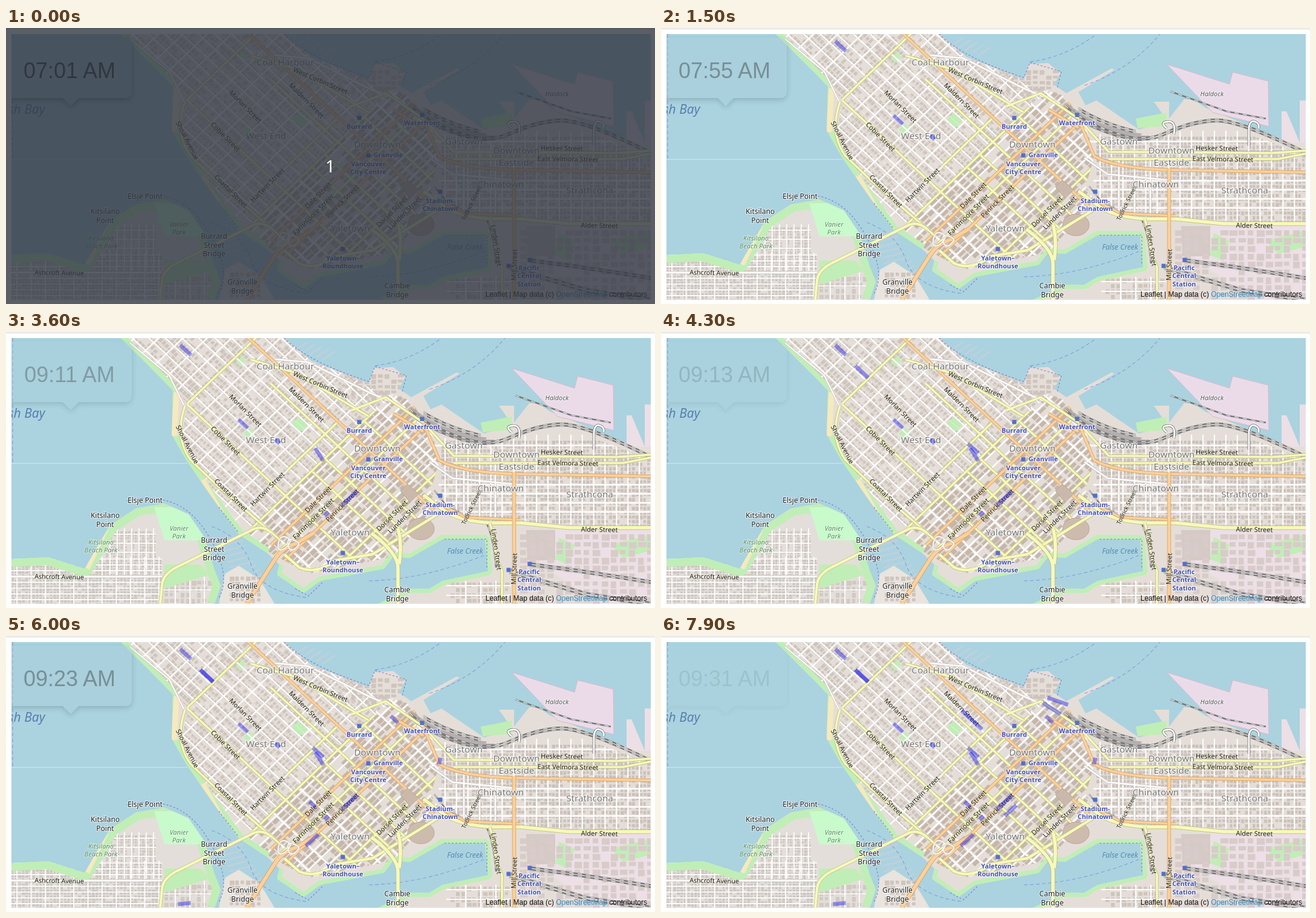
Write an HTML page that moves like this. It is 1073 px wide and 457 px high and loops after 8000 ms.

```html
<!DOCTYPE html>
<html lang="en">
<head>
<meta charset="utf-8">
<title>City map timeline</title>
<style>
html, body { margin: 0; width: 100%; height: 100%; overflow: hidden; background: #fff; }
svg { display: block; width: 100vw; height: 100vh; }
.map text { font-family: "Noto Sans", sans-serif; text-anchor: middle; paint-order: stroke; stroke-linejoin: round; }
.ui { font-family: "Liberation Sans", Arial, sans-serif; }
</style>
</head>
<body>
<svg id="stage" viewBox="0 0 1073 457" xmlns="http://www.w3.org/2000/svg"></svg>
<script>
const WHITE = ['#fff', '#cbc3bd'], YELLOW = ['#f6f9ba', '#b9b878'], ORANGE = ['#fbd09b', '#d09c60'];
const GREEN = '#c0eeb6', PARK = '#c8facc', WATER = '#aad3df';

let seed = 7;
const rnd = () => (seed = (seed * 16807) % 2147483647) / 2147483647;
const range = (a, b, step) => Array.from({ length: Math.floor((b - a) / step) + 1 }, (_, i) => a + i * step);
const shape = (d, fill, extra = '') => `<path d="${d}" fill="${fill}" ${extra}/>`;
const line = (d, color, w, extra = '') =>
  `<path d="${d}" fill="none" stroke="${color}" stroke-width="${w}" stroke-linejoin="round" ${extra}/>`;
const road = (d, [fill, edge], w) => line(d, edge, w + 1.4) + line(d, fill, w);
const group = (body, attrs) => `<g ${attrs}>${body}</g>`;
const clipped = (body, id) => group(body, `clip-path="url(#${id})"`);
const rows = (y0, y1, step, x0, x1) => range(y0, y1, step).map(y => `M${x0} ${y}H${x1}`).join('');
const cols = (x0, x1, step, y0, y1) => range(x0, x1, step).map(x => `M${x} ${y0}V${y1}`).join('');

// loose rows of small buildings filling a rectangle
function boxes(x0, y0, x1, y1, dx, dy, fill) {
  let d = '';
  for (let x = x0; x < x1; x += dx) for (let y = y0; y < y1; y += dy) {
    const w = (dx * (0.55 + 0.35 * rnd())).toFixed(1), h = (dy * (0.5 + 0.4 * rnd())).toFixed(1);
    if (rnd() < 0.85) d += `M${x.toFixed(1)} ${y.toFixed(1)}h${w}v${h}h-${w}z`;
  }
  return shape(d, fill);
}

// text may hold several rows, split by |
function label(str, x, y, size, color, o = {}) {
  const spans = str.split('|').map((s, i) => `<tspan x="${x}" y="${y + i * (o.gap || 14)}">${s}</tspan>`).join('');
  return `<text font-size="${size}" fill="${color}" stroke="${o.halo || '#fff'}" stroke-width="${o.hw ?? 2}"` +
    ` stroke-opacity=".7" ${o.bold ? 'font-weight="700"' : ''} ${o.italic ? 'font-style="italic"' : ''}` +
    ` ${o.rot ? `transform="rotate(${o.rot} ${x} ${y - 4})"` : ''}>${spans}</text>`;
}

const west = '190 10L252 72 276 97 274 170 300 215 352 290 385 335 432 366';
const south = '452 385L448 402 492 432 520 412 625 392 640 372 668 374 722 343H792L797 396 722 412 700 425 668 425 615 450';
const north = '1066 120H1056V190L1034 138H1026V184L900 132 880 118H865L840 150V122H815L838 155 790 168 720 120 702 128 690 106' +
  ' 750 69 745 67 670 108 650 94 660 74 640 58 608 60 600 85 505 48 460 10';
const bay = '9 376L70 373 130 392 172 320 215 292 262 284 302 302 328 340 345 395 355 420 345 450';
const land = `M${west}L${south}H1066L${north}Z`;
const kits = `M${bay}H9Z`;
const core = 'M180 0H450L600 92 665 112 700 150 716 215 702 262 716 285 640 372 500 400 430 362 352 290 290 180 300 118Z';
const east = 'M702 175L835 178 912 155 1066 210V325L760 312 712 290 718 215Z';

function areas() {
  return shape(land, '#e5ded8') + shape(kits, '#e3deda') + shape('M362 400L385 387 420 410 444 450H352Z', '#e9e4de') +
    shape('M836 60L940 93 945 73 1004 88 1005 163 912 140Z', '#ebdbe8', 'stroke="#d5b9ce"') +
    clipped(shape('M1020 120H1066V190H1020ZM910 325H1066V450H980L880 382Z', '#ecdfe5'), 'land') +
    shape('M914 340L940 352 930 386 908 376ZM1000 352L1066 335V362L1020 374ZM785 150L836 140V162L788 166Z', GREEN) +
    shape('M860 328H908V378H862Z', '#d5cac5');
}

// downtown streets follow two slanted axes
function downtown() {
  let g = boxes(150, 40, 518, 380, 6.97, 9.37, '#cec4bc') + boxes(520, 30, 760, 400, 8.5, 15, '#c6b7ab');
  g += shape('M395 160h13v-15h-13zM438 228h20v-16h-20zM300 238h10v-15h-10z', GREEN);
  g += line(rows(23, 380, 18.75, 150, 520), '#fff', 2.3) + line(cols(154.5, 500, 27.9, 30, 380), '#fff', 2.1);
  g += line(rows(32, 375, 18.75, 294, 500), '#f3efec', 0.8);
  g += line(rows(57, 400, 30, 515, 760) + cols(526, 740, 17, 30, 400), '#fff', 2.5);
  g += road(rows(177, 207, 30, 520, 700) + 'M294 117H720M365 237H705M520 297H690M294 117V280M489 150V270M518 40V320M577 30V380M663 40V330', YELLOW, 3.6);
  g += road('M270 267H735M560 40V385M594 10V390', ORANGE, 4);
  return clipped(clipped(group(g, 'transform="matrix(.73 .68 .72 -.69 0 0)"'), 'core'), 'land');
}

function districts() {
  const e = boxes(720, 180, 1066, 325, 6.3, 7.3, '#cac1ba') + line(cols(726, 1066, 18.9, 170, 325), '#fff', 2) +
    line('M700 188H1066' + rows(253, 300, 15, 700, 1066), '#fff', 2.4);
  const k = boxes(9, 377, 258, 450, 5.8, 4.8, '#cbc5c0') + boxes(165, 330, 245, 377, 6, 5, '#cfc7c0') +
    boxes(262, 412, 345, 450, 9, 10, '#d2c9c2') + line(cols(18, 260, 23.5, 372, 450) + cols(172, 245, 12, 325, 402), '#fff', 1.7) +
    line(rows(376, 450, 9.6, 9, 258) + rows(335, 365, 15, 165, 248) + cols(280, 330, 24, 405, 450) + 'M258 427H350', '#fff', 1.7);
  const s = boxes(735, 415, 830, 450, 9, 9, '#cfc5bd') + line(rows(420, 440, 16, 728, 835) + cols(760, 815, 25, 412, 450), '#fff', 2.2) +
    boxes(850, 335, 1066, 450, 15, 13, '#d8cbc9') + boxes(560, 70, 650, 108, 11, 9, '#cfc5bd');
  return clipped(e, 'east') + clipped(k, 'kits') + clipped(s, 'land') + boxes(370, 405, 420, 446, 9, 9, '#cfc5bc');
}

function shores() {
  const beach = line('M282 100L278 172M325 245L357 302', '#f7e9bd', 9);
  return clipped(line(`M${west}`, GREEN, 17) + line(`M${south}`, GREEN, 14) + beach, 'land') +
    clipped(line(`M${bay}`, GREEN, 26) + shape('M245 290H300L338 345 262 345Z', PARK) + shape('M262 385H322L335 402 262 425Z', GREEN) +
      line('M166 326L135 392', '#f7e9bd', 7), 'kits') +
    '<ellipse cx="686" cy="326" rx="22" ry="18" fill="#cdbcad" stroke="#b7a696"/>' +
    shape('M652 263L664 252 682 268 668 282Z', '#cab9ab', 'stroke="#b7a696"');
}

function mainRoads() {
  return road('M445 45L500 50 600 100 660 125M700 215L738 242 840 252' + cols(757, 812, 26, 218, 311), WHITE, 2.6) +
    road('M205 18L270 72 296 125', WHITE, 2) +
    road('M296 122Q278 175 305 212L350 255 455 346', YELLOW, 3.6) +
    road('M405 46L480 68 600 140M570 130L628 108 690 150 740 205L1010 207 1066 203M740 217L1020 217 1066 208', YELLOW, 3.6) +
    road('M690 150L716 212Q750 232 840 235L1066 239M640 135L690 165', ORANGE, 4.2) +
    road('M9 405H255', WHITE, 3.2) +
    road('M255 450L258 418Q260 400 285 388L410 326Q425 320 440 333', YELLOW, 4.4) +
    road('M398 450L445 376Q456 358 480 350L510 332', ORANGE, 6) +
    road('M450 352Q452 335 464 340T462 358Q448 366 450 352M468 358Q462 340 474 344T484 352Q474 366 468 358', WHITE, 1.6) +
    road('M460 368L485 390Q515 402 545 378L606 368 655 338 720 298', YELLOW, 4.4) +
    road('M648 450V390Q648 366 604 333M650 384Q655 350 648 325', YELLOW, 5.6) +
    road('M690 270L728 298Q750 312 800 316H850L930 324H1066', YELLOW, 5.4) +
    road('M715 284L760 307 850 311', ORANGE, 3.6) +
    road('M800 316Q808 345 810 372L820 396V450', YELLOW, 3.6) + road('M840 232V450', ORANGE, 5);
}

function rails() {
  const rail = (d, ...shifts) => shifts.map(y => group(
    line(d, '#777', 2.4) + line(d, '#eee', 1.2, 'stroke-dasharray="7 7"'), `transform="translate(0 ${y})"`)).join('');
  const loops = 'M848 176Q852 154 838 155T836 166M972 195V165Q974 152 982 155T988 166';
  return line('M668 130Q700 158 750 172T800 178', '#a9a4a4', 13, 'opacity=".8"') +
    rail('M668 128Q700 158 750 174T835 172Q880 152 918 151T1066 205', 0, 4) + rail('M690 140Q730 165 785 178', -8, -4, 5) +
    rail('M862 382L950 394 1066 412', 0, 4) + rail('M832 394L960 432 1066 448', 0, 5) +
    rail('M842 105L935 138 1000 150', 0) + rail('M708 262L730 290 795 318Q806 340 810 390', 0) +
    line(loops, '#777', 4.5) + line(loops, '#fff', 2.8);
}

function waterLines() {
  const piers = range(0, 4, 1).map(i => `M${480 + i * 11} ${30 + i * 4}l20 -14`).join('') +
    range(0, 5, 1).map(i => `M${354 + i * 3} ${345 + i * 9}l34 -9M${400 + i * 5} ${385 + i * 7}l9 -6`).join('');
  return line(piers, '#c3cfdc', 2.6) +
    line('M11 10V217M610 56Q670 48 720 10M700 95Q775 70 825 10M340 322Q390 340 405 385T500 440M600 412Q690 410 790 370', '#7c8fdd', 1.1, 'stroke-dasharray="6 4" opacity=".8"') +
    line('M200 280Q285 260 330 330T352 440M460 10Q500 50 600 82L610 57 662 72 655 100M352 290L385 333M478 425L500 437 525 413M725 343H795V392', '#8878cf', 1.1, 'stroke-dasharray="3 3"') +
    line('M9 217.5H300', '#d3e8ee', 1);
}

function labels() {
  const st = (s, x, y, rot = 1, size = 11) => label(s, x, y, size, '#1c1c1c', { rot, halo: '#f6f4d8', hw: 1.3 });
  const down = (s, x, y) => st(s, x, y, 45), up = (s, x, y) => st(s, x, y, -45);
  const area = (s, x, y) => label(s, x, y, 15.2, '#777', { gap: 20, hw: 2.4 });
  const stop = (s, x, y) => label(s, x, y, 10.8, '#4553b4', { bold: 1, gap: 13.4, hw: 2.4 });
  const spot = (s, x, y) => label(s, x, y, 12, '#222', { gap: 14.5, hw: 2.2 });
  const park = (s, x, y) => label(s, x, y, 11, '#4f8a55', { italic: 1, gap: 13, hw: 1.5 });
  const square = (x, y) => `<rect x="${x - 3.5}" y="${y - 3.5}" width="7" height="7" fill="#5470c9"/>`;
  return st('West Corbin Street', 520, 91, 23) + down('Maldern Street', 497, 124) + down('Morlan Street', 396, 134) +
    down('Cobie Street', 363, 184) + st('Shoal Avenue', 300, 190, 63) + down('Coastal Street', 372, 274) +
    up('Hartwin Street', 432, 264) + up('Dale Street', 516, 281) + up('Farnmoore Street', 508, 313) +
    up('Penrick Street', 556, 291) + up('Dorsel Street', 638, 308) + up('Lunden Street', 659, 310) +
    st('Tobrick Street', 769, 294, -64, 9.6) + st('Hesker Street', 919, 203) + st('East Velmora Street', 929, 221) +
    st('Alder Street', 981, 331) + st('Linden Street', 811, 364, 82) + st('Mill Street', 840, 396, -88) +
    st('Ashcroft Avenue', 88, 409, 1, 10.6) +
    area('Coal Harbour', 462, 62) + area('West End', 430, 184) + area('Downtown', 614, 198) + area('Gastown', 757, 193) +
    area('Downtown|Eastside', 844, 208) + area('Chinatown', 818, 264) + area('Strathcona', 965, 274) + area('Yaletown', 569, 337) +
    square(584, 149) + square(599, 211) + square(557, 366) + square(718, 271) + square(688, 144) + square(866, 384) + square(831, 394) +
    stop('Burrard', 584, 167) + stop('Waterfront', 688, 161) + stop('Granville', 632, 214) + stop('Vancouver|City Centre', 599, 229) +
    stop('Stadium-|Chinatown', 718, 290) + stop('Yaletown–|Roundhouse', 557, 385) + stop('Pacific|Central|Station', 865, 401) +
    spot('Elsje Point', 230, 283) + spot('Kitsilano|Point', 164, 308) + spot('Burrard|Street|Bridge', 344, 349) +
    spot('Granville|Bridge', 391, 425) + spot('Cambie|Bridge', 647, 431) +
    park('Vanier|Park', 286, 329) + park('Kitsilano|Beach Park', 157, 352) +
    label('Haldock', 911, 113, 10.8, '#555', { italic: 1 }) +
    label('False Creek', 759, 367, 12, '#5b87b5', { italic: 1, hw: 0 }) +
    label('English Bay', 11, 142, 21, '#5a7fae', { italic: 1, hw: 0 });
}

// trips in order of departure: centre, length, and angle of the street
const DOWN = 43, UP = -43;
const trips = [
  [449, 181, 10, DOWN], [392, 152, 21, DOWN], [297, 30, 24, DOWN],
  [568, 275, 34, UP], [518, 203, 25, 58], [530, 301, 9, UP],
  [332, 66, 29, DOWN], [516, 193, 23, DOWN], [507, 279, 14, DOWN],
  [642, 138, 16, DOWN], [717, 207, 11, -80], [506, 338, 28, UP],
  [295, 443, 21, -5], [332, 66, 29, DOWN], [578, 289, 26, UP],
  [646, 120, 35, 32], [514, 139, 46, DOWN], [656, 108, 36, 19]
];
const startOf = i => i < 3 ? 100 + 350 * i : 2900 + 310 * (i - 3);
const tripBar = ([x, y, len, turn]) => line(`M${-len / 2} 0h${len}`, '#1414f0', 6.5,
  `class="trip" opacity=".42" transform="translate(${x} ${y}) rotate(${turn})"`);

const clip = (id, d) => `<clipPath id="${id}"><path d="${d}"/></clipPath>`;
document.getElementById('stage').innerHTML =
  `<defs>${clip('frame', 'M9 10H1066V450H9Z') + clip('land', land) + clip('core', core) + clip('east', east) + clip('kits', kits)}
  <filter id="shade" x="-20%" y="-20%" width="140%" height="150%"><feDropShadow dx="0" dy="3" stdDeviation="5" flood-opacity=".4"/></filter></defs>
  <rect width="1073" height="457" fill="#fff"/><path d="M0 1.5H1073" stroke="#d0d0c8"/>
  <g class="map" clip-path="url(#frame)"><rect x="9" y="10" width="1057" height="440" fill="${WATER}"/>` +
  areas() + districts() + downtown() + shores() + waterLines() + rails() + mainRoads() + labels() + trips.map(tripBar).join('') +
  `</g><g class="ui" clip-path="url(#frame)"><g id="popup">
  <path d="M0 16H196Q208 16 208 28V104Q208 116 196 116H120L107 129 94 116H0Z" fill="#a8ceda" filter="url(#shade)"/>
  <text id="clock" x="105" y="83" font-size="36" text-anchor="middle" fill="#333"></text></g>
  <text x="1060" y="445" font-size="12" text-anchor="end" fill="#111">Leaflet | Map data (c) <tspan fill="#2b8cc0">OpenStreetMap</tspan> contributors</text></g>
  <g id="cover"><rect width="1073" height="457" fill="#303642" opacity=".8"/>
  <text x="536" y="239" font-size="28" text-anchor="middle" fill="#fff" font-family="Noto Sans, sans-serif">1</text></g>`;

const [popup, clock, cover] = ['popup', 'clock', 'cover'].map(id => document.getElementById(id));
const bars = [...document.querySelectorAll('.trip')];
const two = n => String(n).padStart(2, '0');

// [half second, minutes past seven]
const pace = [[0, 1], [1, 8], [5, 102], [7, 131], [15, 151]];
function minutes(tick) {
  const i = Math.max(1, pace.findIndex(([k]) => k >= tick));
  const [k0, m0] = pace[i - 1], [k1, m1] = pace[i];
  return Math.floor(m0 + (m1 - m0) * (tick - k0) / (k1 - k0));
}

function draw(t) {
  const min = minutes(Math.floor(t / 500)), quiet = t >= 6900 && t < 7200;
  clock.textContent = `${two(7 + Math.floor(min / 60))}:${two(min % 60)} AM`;
  popup.setAttribute('opacity', t === 0 ? 1 : quiet ? 0 : 0.42 - 0.08 * (t % 500) / 100);
  cover.style.display = t === 0 ? '' : 'none';
  bars.forEach((bar, i) => { bar.style.display = t >= startOf(i) ? '' : 'none'; });
}

let last = -1;
function loop() {
  const t = Math.floor(performance.now() % 8000 / 100) * 100;
  if (t !== last) draw(last = t);
  requestAnimationFrame(loop);
}
loop();
</script>
</body>
</html>
```
